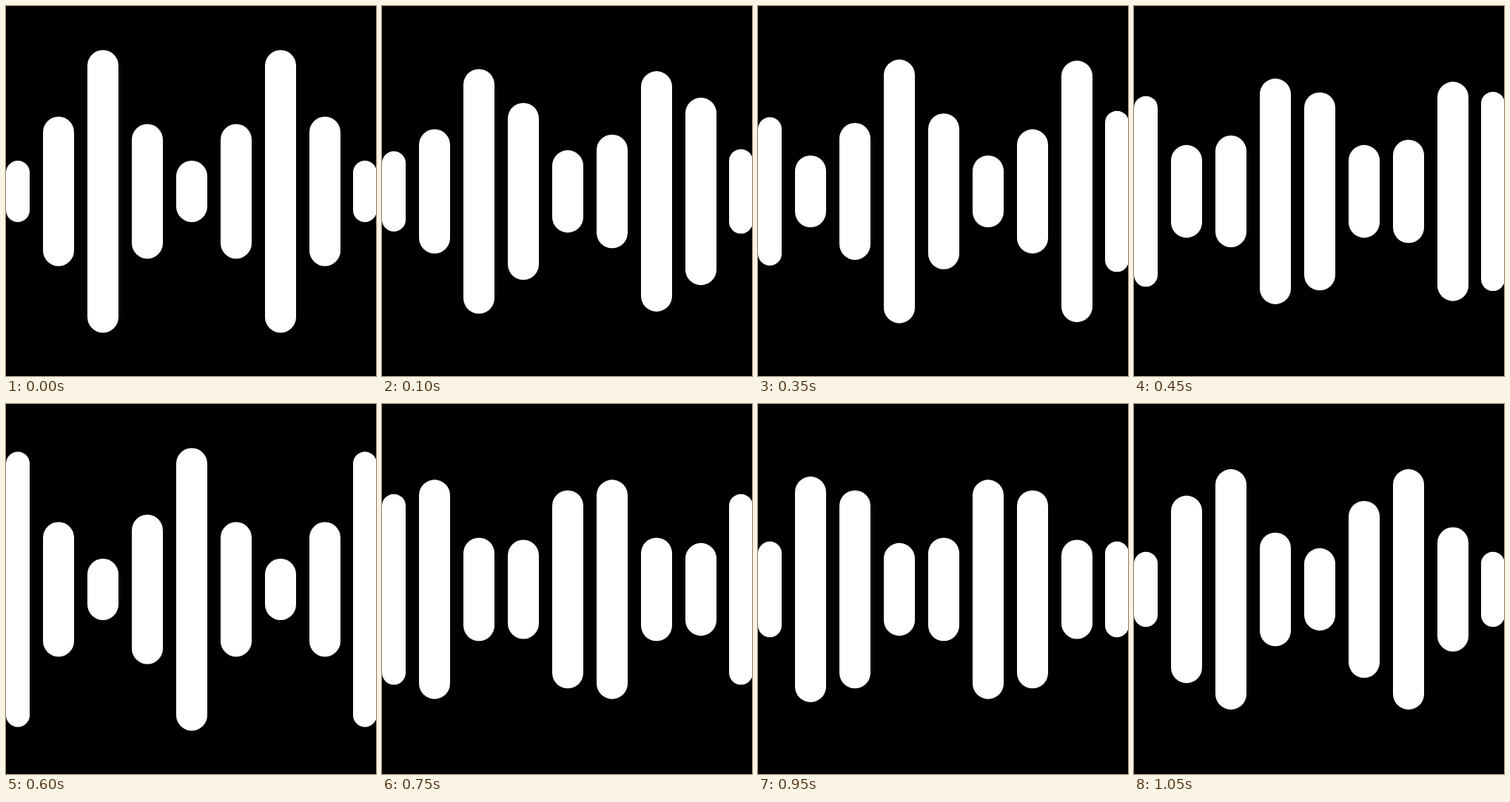
An HTML page for the animation above (1.1 s loop, 500 by 500 pixels).

```html
<!DOCTYPE html>
<html lang="en">
<head>
<meta charset="utf-8">
<title>Sound bars</title>
<style>
  html, body { margin: 0; width: 100%; height: 100%; overflow: hidden; background: #000; }
  svg { display: block; width: 100%; height: 100%; }
</style>
</head>
<body>
<svg id="stage" viewBox="0 0 500 500" fill="#fff"></svg>
<script>
  const STEP_MS = 50, STEPS = 22, SPAN = 7, MID_Y = 250.5;

  // Half heights
  const S = 41.5, M = 91, L = 101, T = 191;

  // The narrow outer bars have smaller caps, so they end 5px earlier.
  const CAP = 5;

  // Each bar: half heights at the five key poses of a loop
  const poses = [
    [S, M - CAP, T - CAP, M - CAP, S - CAP],
    [L, S, M, T, L],
    [T, L, S, M, T],
    [M, T, L, S, M],
    [S, M, T, M, S],
    [M, S, M, T, M],
    [T, M, S, M, T],
    [L, T, M, S, L],
    [S, L - CAP, T - CAP, M - CAP, S - CAP]
  ];

  const stage = document.getElementById("stage");
  const bars = poses.map((_, i) => {
    const rect = document.createElementNS("http://www.w3.org/2000/svg", "rect");
    const outer = i === 0 || i === poses.length - 1;
    const width = outer ? 32 : 42;
    rect.setAttribute("x", i === 0 ? 0 : i * 60 - (outer ? 11 : 10));
    rect.setAttribute("width", width);
    rect.setAttribute("rx", width / 2);
    return stage.appendChild(rect);
  });

  // After a steady start, every fourth pose is skipped.
  const phaseAt = step => step + Math.max(0, Math.floor((step - 4) / 3));

  function draw(time) {
    const phase = phaseAt(Math.floor(time / STEP_MS) % STEPS);
    const key = Math.floor(phase / SPAN);
    const mix = phase / SPAN - key;
    bars.forEach((bar, i) => {
      const from = poses[i][key], to = poses[i][key + 1];
      const half = from + (to - from) * mix;
      bar.setAttribute("y", MID_Y - half);
      bar.setAttribute("height", half * 2);
    });
  }

  const start = performance.now();
  function tick() {
    draw(performance.now() - start);
    requestAnimationFrame(tick);
  }
  tick();
</script>
</body>
</html>
```
